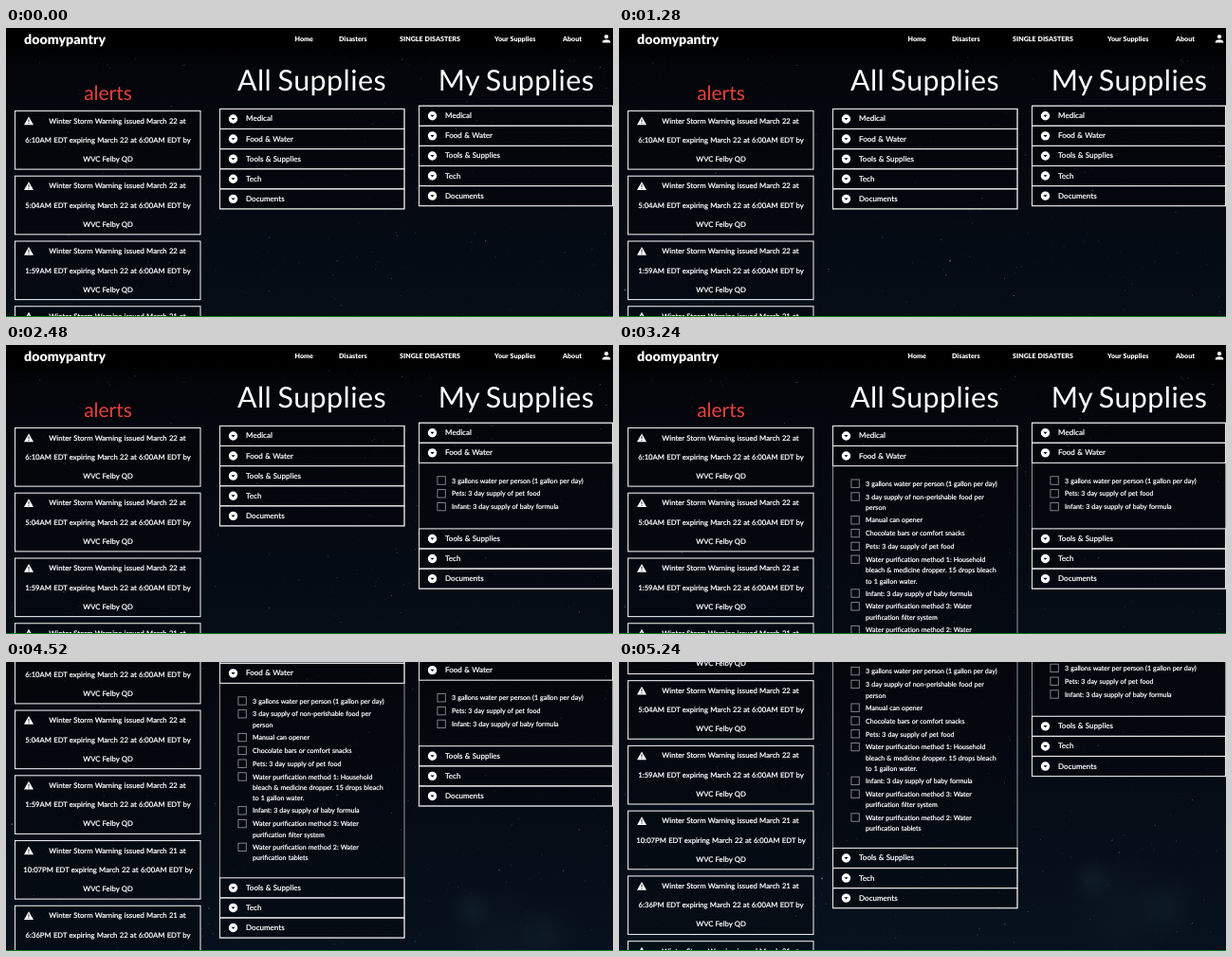
Write an HTML page with a canvas that moves like this. It is 640 px wide and 305 px high and loops after 5.28 s.

```html
<!DOCTYPE html>
<html lang="en">
<head>
<meta charset="utf-8">
<title>Supplies</title>
<style>
  html, body { margin: 0; width: 100%; height: 100%; overflow: hidden; background: #000; }
  canvas, #stage { position: absolute; left: 0; top: 0; display: block; }
  text {
    font-family: Lato, "Open Sans", sans-serif;
    fill: #fff;
    stroke: #fff;
    stroke-width: .2;
    word-spacing: .04em;
    text-rendering: geometricPrecision;
  }
  .mid { text-anchor: middle; }
  .brand { font-size: 14.2px; font-weight: 900; stroke: none; }
  .nav { font-size: 7.1px; font-weight: 900; stroke: none; }
  .title { font-size: 30.4px; letter-spacing: .015em; word-spacing: -.06em; stroke: none; }
  .red { font-size: 21px; fill: #e8413d; stroke: none; }
  .alert { font-size: 7.7px; font-weight: 500; }
  .row { font-size: 8px; font-weight: 500; }
  .item { font-size: 7.05px; font-weight: 500; }
  .line { fill: none; stroke: #e4e6e8; stroke-width: 1.1; }
  .frame { stroke: #b4b8bd; stroke-width: .8; }
  .shade { fill: #000; fill-opacity: .25; }
  .box { fill: none; stroke: #8b8f94; stroke-width: .9; }
</style>
</head>
<body>
<canvas id="sky" width="640" height="305"></canvas>
<svg id="stage" width="640" height="305">
  <defs>
    <linearGradient id="fade" x2="0" y2="1">
      <stop offset=".5" stop-color="#000"/>
      <stop offset="1" stop-color="#000" stop-opacity="0"/>
    </linearGradient>
  </defs>
  <g id="page"></g>
  <rect y="304" width="640" height="1" fill="#087a14"/>
</svg>
<script>
const LOOP = 5280;
const ROW = 21.1;
const SCROLL = { start: 4280, distance: 137, tau: 165 };
const OPEN_MS = 300;

const nav = [["Home", 304.5], ["Disasters", 351], ["SINGLE DISASTERS", 415],
             ["Your Supplies", 515], ["About", 587]];
const alerts = [["6:10AM", 22], ["5:04AM", 22], ["1:59AM", 22],
                ["10:07PM", 21], ["6:36PM", 21], ["6:21PM", 21]];
const labels = ["Medical", "Food &amp; Water", "Tools &amp; Supplies", "Tech", "Documents"];

const water = "3 gallons water per person (1 gallon per day)";
const pets = "Pets: 3 day supply of pet food";
const infant = "Infant: 3 day supply of baby formula";

const panels = [
  { id: "all", x: 225.5, y: 85.4, w: 194.5, body: 205.4, opens: 2600, items: [
    [water],
    ["3 day supply of non-perishable food per", "person"],
    ["Manual can opener"],
    ["Chocolate bars or comfort snacks"],
    [pets],
    ["Water purification method 1: Household", "bleach &amp; medicine dropper. 15 drops bleach", "to 1 gallon water."],
    [infant],
    ["Water purification method 3: Water", "purification filter system"],
    ["Water purification method 2: Water", "purification tablets"]
  ] },
  { id: "mine", x: 435.5, y: 82.2, w: 204, body: 69.5, opens: 1400,
    items: [[water], [pets], [infant]] }
];

const text = (cls, x, y, s) => `<text class="${cls}" x="${x}" y="${y}">${s}</text>`;

function header() {
  return `<rect width="640" height="36" fill="url(#fade)"/>`
    + text("brand", 19, 16.6, "doomypantry")
    + nav.map(([s, x]) => text("nav", x, 13.8, s)).join("")
    + `<circle cx="633" cy="9.2" r="2.1" fill="#fff"/>
       <path d="M628.8 15.6v-1.1c0-1.6 2.6-2.3 4.2-2.3s4.2.7 4.2 2.3v1.1z" fill="#fff"/>`
    + text("red mid", 107.5, 75.6, "alerts")
    + text("title mid", 322.5, 66, "All Supplies")
    + text("title mid", 538, 66, "My Supplies");
}

function alertCard([time, day], i) {
  return `<g transform="translate(0 ${87.5 + i * 68.75})">
    <rect class="line shade" x="9.5" width="195.5" height="61.6"/>
    <path d="M24 6l5 8.8h-10z" fill="#fff"/>
    <path d="M24 9v2.6M24 12.5v1.1" stroke="#05080d" stroke-width=".9"/>
    ${text("alert mid", 117.5, 13.1, `Winter Storm Warning issued March ${day} at`)}
    ${text("alert mid", 107.5, 33.5, `${time} EDT expiring March 22 at 6:00AM EDT by`)}
    ${text("alert mid", 107.5, 53.6, "WVC Felby QD")}
  </g>`;
}

function row(label, i, width) {
  const y = i * ROW, c = y + ROW / 2;
  return `<rect class="line" y="${y}" width="${width}" height="${ROW}"/>
    <path d="M14 ${c}m-4.7 0a4.7 4.7 0 1 0 9.4 0a4.7 4.7 0 1 0 -9.4 0" fill="#fff"/>
    <path d="M11.9 ${c - .9}h4.2l-2.1 2.2z" fill="#05080d"/>`
    + text("row", 27.6, c + 2.5, label);
}

function itemList(items) {
  let y = 18.7;
  return items.map(lines => {
    const part = `<rect class="box" x="19.4" y="${y - 4.3}" width="8.4" height="8.4"/>`
      + lines.map((s, k) => text("item", 34.6, y + 2.6 + k * 11.4, s)).join("");
    y += 13.8 + 11 * (lines.length - 1);
    return part;
  }).join("");
}

function panel(p) {
  const rows = labels.map((s, i) => row(s, i, p.w));
  return `<g transform="translate(${p.x} ${p.y})">
    <rect id="${p.id}-frame" class="frame shade" width="${p.w}" height="${5 * ROW}"/>
    <svg id="${p.id}-body" y="${2 * ROW}" width="${p.w}" height="0" overflow="hidden">${itemList(p.items)}</svg>
    ${rows.slice(0, 2).join("")}
    <g id="${p.id}-rest">${rows.slice(2).join("")}</g>
  </g>`;
}

const $ = id => document.getElementById(id);
const page = $("page");
page.innerHTML = header() + alerts.map(alertCard).join("") + panels.map(panel).join("");
for (const p of panels) {
  p.frame = $(p.id + "-frame");
  p.bodyBox = $(p.id + "-body");
  p.rest = $(p.id + "-rest");
}

// Night sky
const ctx = $("sky").getContext("2d");
let seed = 71;
const rand = () => (seed = seed * 16807 % 2147483647) / 2147483647;
const stars = Array.from({ length: 900 }, () => ({
  x: rand() * 640, y: 26 + rand() * 424,
  size: rand() < .06 ? 1.6 : 1,
  glow: .08 + .5 * rand() ** 6
}));
const night = ctx.createLinearGradient(0, 0, 0, 450);
[[0, "#000"], [.09, "#03050a"], [.45, "#050a13"], [1, "#07121e"]]
  .forEach(([at, color]) => night.addColorStop(at, color));

function cloud(x, y, r, alpha) {
  const g = ctx.createRadialGradient(x, y, 0, x, y, r);
  g.addColorStop(0, `rgba(70,95,120,${alpha})`);
  g.addColorStop(1, "rgba(70,95,120,0)");
  ctx.fillStyle = g;
  ctx.fillRect(x - r, y - r, 2 * r, 2 * r);
}

function drawSky(t, scroll) {
  ctx.setTransform(1, 0, 0, 1, 0, -scroll);
  ctx.fillStyle = night;
  ctx.fillRect(0, 0, 640, 450);
  const drift = (t - LOOP) * .012;
  cloud(500 + drift, 366, 24, .14);
  cloud(578 + drift, 394, 36, .1);
  cloud(530 + drift, 398, 60, .07);
  ctx.fillStyle = "#b9cde6";
  for (const s of stars) {
    const shimmer = .65 + .35 * Math.sin(s.x * .06 + s.y * .04 + t * .0022);
    ctx.globalAlpha = s.glow * shimmer;
    ctx.fillRect(s.x, s.y, s.size, s.size);
  }
  ctx.globalAlpha = 1;
}

const clamp = v => Math.min(1, Math.max(0, v));
const ease = v => v * v * (3 - 2 * v);

function render(t) {
  const since = Math.max(0, t - SCROLL.start);
  const scroll = SCROLL.distance * (1 - Math.exp(-since / SCROLL.tau));
  page.setAttribute("transform", `translate(0 ${-scroll})`);
  for (const p of panels) {
    const h = p.body * ease(clamp((t - p.opens) / OPEN_MS));
    p.frame.setAttribute("height", 5 * ROW + h);
    p.bodyBox.setAttribute("height", h);
    p.rest.setAttribute("transform", `translate(0 ${h})`);
  }
  drawSky(t, scroll);
}

const begin = performance.now();
function tick() {
  render((performance.now() - begin) % LOOP);
  requestAnimationFrame(tick);
}
tick();
</script>
</body>
</html>
```
